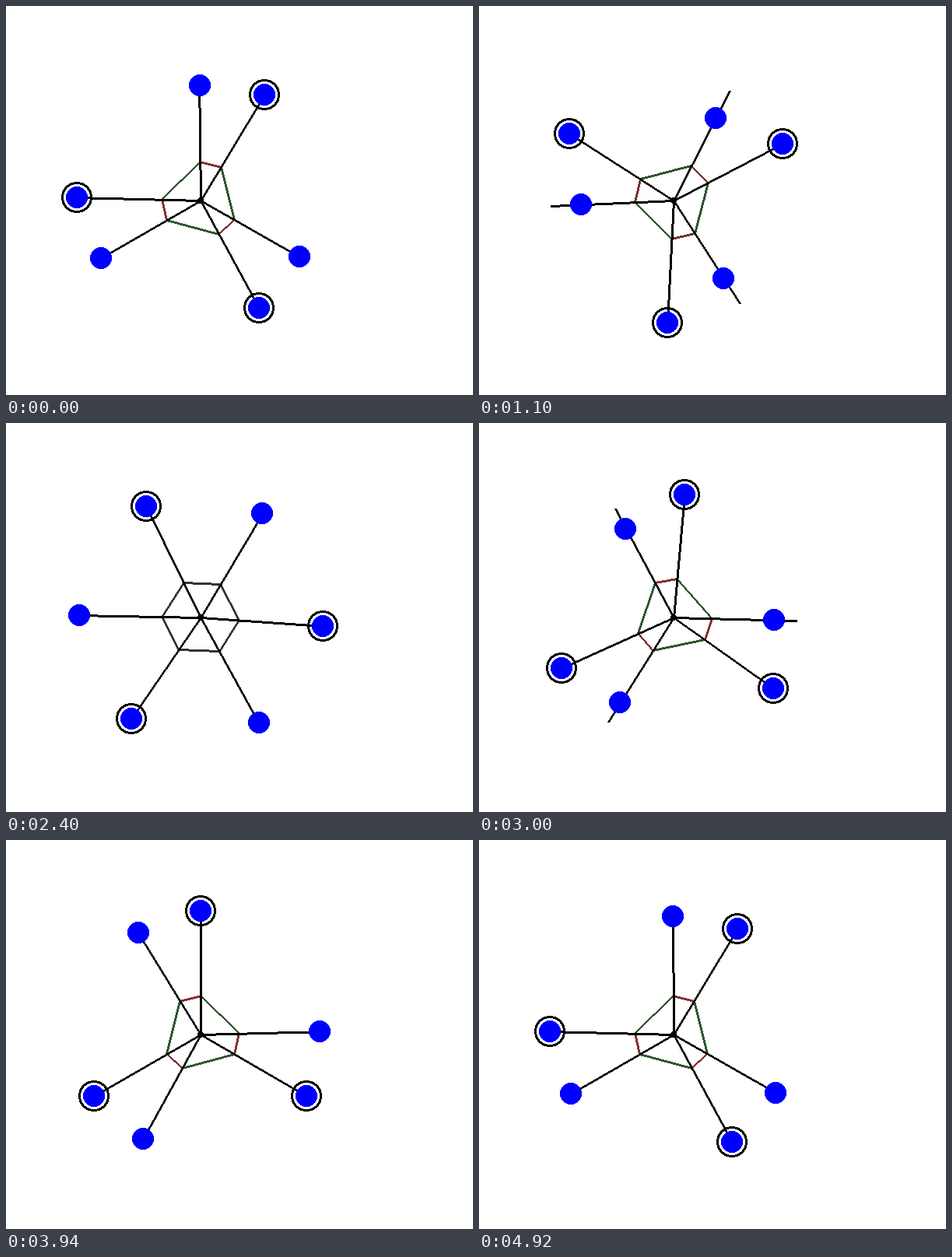
These frames come from a looping animation (600x500 px, 4.94 s). An HTML page with a canvas:

```html
<!DOCTYPE html>
<html lang="en">
<head>
<meta charset="utf-8">
<title>Swinging arms</title>
<style>
  html, body { margin: 0; width: 100%; height: 100%; overflow: hidden; background: #fff; }
  canvas { display: block; }
</style>
</head>
<body>
<canvas id="stage" width="600" height="500"></canvas>
<script>
const ctx = document.getElementById('stage').getContext('2d');
const LOOP = 4940, STEP = 20, OFFSET = 1027, SWING = 973;
const CX = 250, CY = 250, ROD = 158.1, HUB = 50;
const RAD = Math.PI / 180, THIRD = 2 * Math.PI / 3;

// Swing phase in degrees against time: quicker while the weights are pulled in.
const PHASE = [[0, 0], [181, 31], [407, 78.5], [520, 98.4], [SWING, 180]];

function phaseAt(ms) {
  let i = 1;
  while (i < PHASE.length - 1 && ms > PHASE[i][0]) i++;
  const [t0, p0] = PHASE[i - 1], [t1, p1] = PHASE[i];
  return p0 + (p1 - p0) * (ms - t0) / (t1 - t0);
}

// Weights slide in at a steady rate, then back out to the rod's end.
function reach(ms) {
  return ROD - Math.max(0, Math.min(0.222 * (ms - 5), 0.2 * (522 - ms)));
}

// Points snap to whole pixels.
function polar(angle, r) {
  return [Math.floor(CX + r * Math.cos(angle)), Math.floor(CY - r * Math.sin(angle))];
}

// Hard-edged line, three pixels thick across its shorter axis.
function line([x0, y0], [x1, y1], color) {
  const dx = x1 - x0, dy = y1 - y0;
  const steep = Math.abs(dy) > Math.abs(dx);
  const n = Math.max(Math.abs(dx), Math.abs(dy));
  ctx.fillStyle = color;
  for (let i = 0; i <= n; i++) {
    const x = Math.round(x0 + dx * i / n), y = Math.round(y0 + dy * i / n);
    if (steep) ctx.fillRect(x - 1, y, 3, 1);
    else ctx.fillRect(x, y - 1, 1, 3);
  }
}

// Hard-edged disc, or a ring when an inner radius is given.
function disc(x, y, r, color, inner = 0) {
  const half = (radius, j) =>
    Math.round(Math.sqrt(Math.max(0, radius * radius - (j + 0.5) ** 2)));
  ctx.fillStyle = color;
  for (let j = -r; j < r; j++) {
    const out = half(r, j), gap = half(inner, j);
    ctx.fillRect(x - out, y + j, out - gap, 1);
    ctx.fillRect(x + gap, y + j, out - gap, 1);
  }
}

// Red when pressed together, green when stretched.
function springColor(a, b) {
  const d = Math.hypot(a[0] - b[0], a[1] - b[1]) - HUB;
  return d < 0 ? `rgb(${52 - 3.6 * d}, 48, 50)` : `rgb(46, ${50 + 2 * d}, 48)`;
}

function arms(base, r, locked) {
  return [0, 1, 2].map(i => ({ angle: base + i * THIRD, r, locked }));
}

function draw(now) {
  const t = Math.floor(now % LOOP / STEP) * STEP;
  const T = (t + OFFSET) % LOOP;
  const n = Math.floor(T / SWING);
  const ms = T - n * SWING;
  const turn = (1 - Math.cos(phaseAt(ms) * RAD)) / 2;
  const aMoves = n % 2 === 0;

  // Each swing carries one set of arms forward by one radian.
  const a = 30 * RAD - 0.5 + Math.ceil(n / 2) + (aMoves ? turn : 0);
  const b = 90 * RAD + Math.floor(n / 2) + (aMoves ? 0 : turn);
  const r = reach(ms);
  const all = [
    ...arms(a, aMoves ? r : ROD, !aMoves),
    ...arms(b, aMoves ? ROD : r, aMoves)
  ];

  ctx.fillStyle = '#fff';
  ctx.fillRect(0, 0, 600, 500);

  const full = 2 * Math.PI;
  const knots = all.map(m => (m.angle % full + full) % full)
    .sort((p, q) => p - q)
    .map(angle => polar(angle, HUB));
  knots.forEach((p, i) => {
    const q = knots[(i + 1) % knots.length];
    line(p, q, springColor(p, q));
  });

  for (const m of all) line([CX, CY], polar(m.angle, ROD), '#000');
  disc(CX, CY, 4, '#000');
  for (const m of all) {
    const [x, y] = polar(m.angle, m.r);
    disc(x, y, 14, '#00f');
    if (m.locked) disc(x, y, 20, '#000', 17);
  }
}

const start = performance.now();
function tick() {
  draw(performance.now() - start);
  requestAnimationFrame(tick);
}
tick();
</script>
</body>
</html>
```
